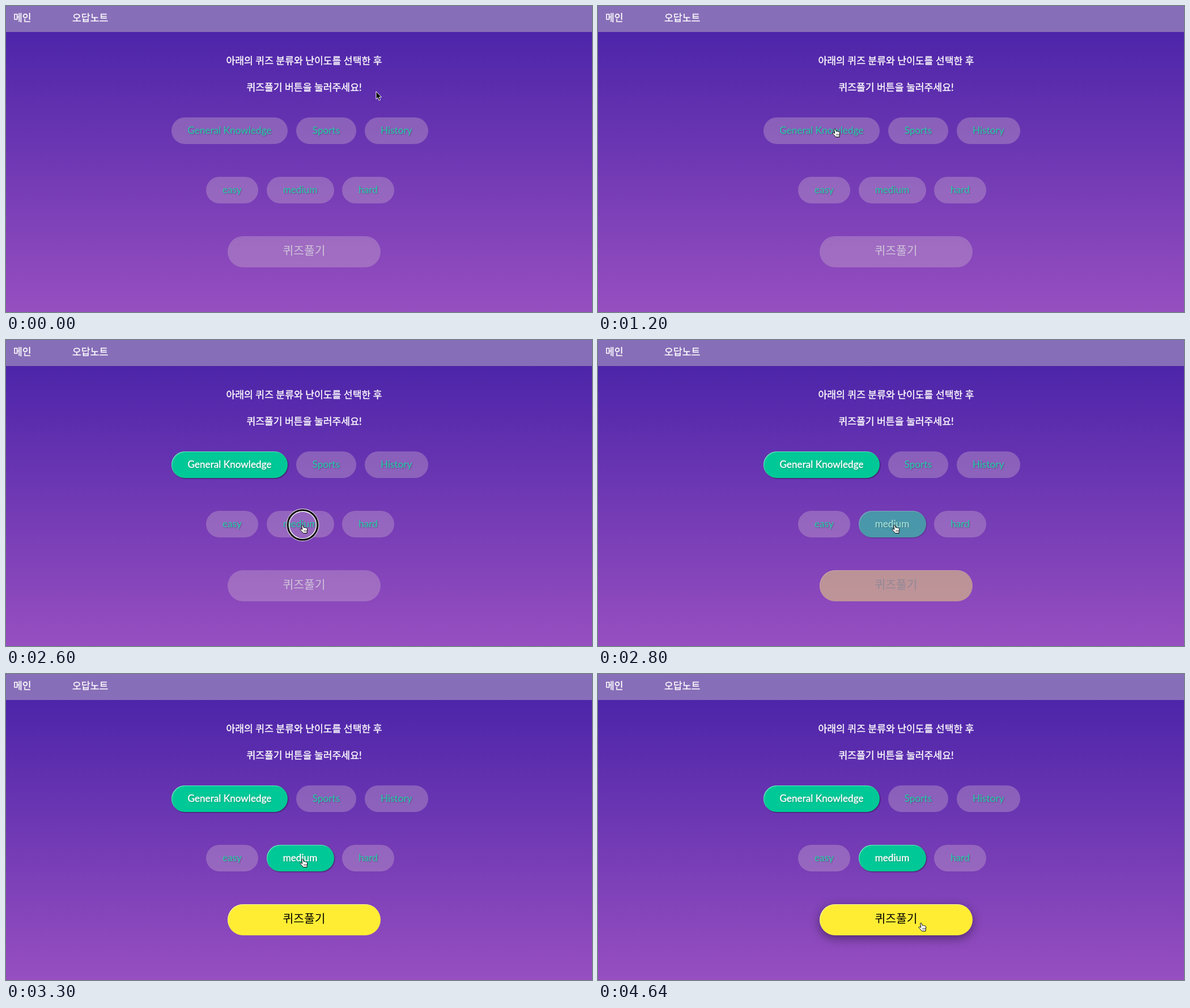
These frames come from a looping animation (1034 by 541 pixels, 4790 ms). An HTML page:

```html
<!DOCTYPE html>
<html lang="ko">
<head>
<meta charset="utf-8">
<title>퀴즈</title>
<style>
html, body { margin: 0; width: 100%; height: 100%; overflow: hidden; }
body {
  position: relative;
  background: linear-gradient(#4d25a9 46px, #974fc0 541px);
  font: 17.2px Lato, "Noto Sans CJK KR", "Noto Sans CJK", sans-serif;
  color: #fff;
}
body *, .pick::after { animation: 4790ms linear infinite; }
nav { position: absolute; inset: 0 0 auto; height: 46px; background: #876eb8; }
nav span { position: absolute; line-height: 42px; }
nav span, p { -webkit-text-stroke: .35px #fff; white-space: nowrap; }
p { position: absolute; left: 0; width: 1052px; margin: 0; line-height: 30px; text-align: center; }

.pill {
  position: absolute; height: 47px; border-radius: 24px;
  background: rgba(205, 180, 205, .35);
  color: #22cfa9; line-height: 45px; text-align: center; white-space: nowrap;
  text-shadow: 1px 1px 2px rgba(0, 0, 0, .3);
}
.pick::after {
  content: attr(data-label);
  position: absolute; inset: 0; border-radius: 24px; opacity: 0;
  background: #00c896; color: #fff;
  -webkit-text-stroke: .4px #fff;
  box-shadow: 1px 1px 2px rgba(0, 0, 0, .5), inset 1px 1px 1px rgba(255, 255, 255, .45);
}
.topic::after { animation-name: topic; }
.level::after { animation-name: level; }

.start {
  position: absolute; left: 391px; top: 407px; width: 270px; height: 54.5px;
  border-radius: 28px; font-size: 20.4px; line-height: 51px; text-align: center;
  animation-name: start;
}
svg { position: absolute; left: 0; top: 0; overflow: visible; }
.ring { opacity: 0; animation-name: ring; fill: none; }
.cursor { animation-name: move; }
.arrow { animation-name: arrow; animation-timing-function: step-end; }
.hand { animation-name: hand; animation-timing-function: step-end; }

@keyframes topic {
  0%, 31.4% { opacity: 0 }
  35.4%, 100% { opacity: 1 }
}
@keyframes level {
  0%, 56.4% { opacity: 0 }
  60.5%, 100% { opacity: 1 }
}
@keyframes start {
  0%, 56.4% {
    background: rgba(205, 180, 205, .35); color: #d0c3da;
    box-shadow: 0 4px 16px rgba(0, 0, 0, 0), inset 1px 1px 1px rgba(255, 255, 255, 0);
  }
  62.63% {
    background: #f7e245; color: #111;
    box-shadow: 0 4px 16px rgba(0, 0, 0, 0), inset 1px 1px 1px rgba(255, 255, 255, .5);
  }
  68.9%, 77.2% {
    background: #ffed34; color: #000;
    box-shadow: 0 4px 16px rgba(0, 0, 0, 0), inset 1px 1px 1px rgba(255, 255, 255, .5);
  }
  81.42% {
    background: #ffed34; color: #000;
    box-shadow: 0 3px 14px rgba(0, 0, 0, .25), inset 1px 1px 1px rgba(255, 255, 255, .5);
  }
  91.8%, 100% {
    background: #ffed34; color: #000;
    box-shadow: 0 5px 18px rgba(0, 0, 0, .42), inset 1px 1px 1px rgba(255, 255, 255, .5);
  }
}
@keyframes move {
  0%, 2% { transform: translate(653px, 151px); animation-timing-function: ease-in }
  12.526% { transform: translate(535px, 187px); animation-timing-function: ease-out }
  16.7%, 39.6% { transform: translate(418px, 217px); animation-timing-function: ease-in-out }
  52.2%, 70.9% { transform: translate(523px, 327px); animation-timing-function: ease-in-out }
  81.4%, 96.85% { transform: translate(557px, 440px) }
  96.86%, 100% { transform: translate(570px, 440px) }
}
@keyframes arrow {
  0%, 43.8%, 74% { visibility: visible }
  14.6%, 48%, 78% { visibility: hidden }
}
@keyframes hand {
  0%, 43.8%, 74% { visibility: hidden }
  14.6%, 48%, 78% { visibility: visible }
}
@keyframes ring {
  0%, 29.1% { opacity: 0; transform: translate(418px, 217px) }
  29.2%, 33.3% { opacity: 1; transform: translate(418px, 217px) }
  33.4% { opacity: 0; transform: translate(418px, 217px) }
  54.2% { opacity: 0; transform: translate(523.5px, 327px) }
  54.25%, 58.4% { opacity: 1; transform: translate(523.5px, 327px) }
  58.45%, 100% { opacity: 0; transform: translate(523.5px, 327px) }
}
</style>
</head>
<body>
<nav>
  <span style="left:13px">메인</span>
  <span style="left:117px">오답노트</span>
</nav>
<p style="top:82px">아래의 퀴즈 분류와 난이도를 선택한 후</p>
<p style="top:129px">퀴즈풀기 버튼을 눌러주세요!</p>

<div class="pill pick topic" data-label="General Knowledge" style="left:292px;top:197px;width:205px">General Knowledge</div>
<div class="pill" style="left:512px;top:197px;width:106px">Sports</div>
<div class="pill" style="left:632.5px;top:197px;width:112.5px">History</div>

<div class="pill" style="left:353px;top:302px;width:92px">easy</div>
<div class="pill pick level" data-label="medium" style="left:459.5px;top:302px;width:119px">medium</div>
<div class="pill" style="left:593px;top:302px;width:92px">hard</div>

<div class="start">퀴즈풀기</div>

<svg width="1034" height="541">
  <g class="ring">
    <circle r="26" stroke="#fff" stroke-width="5.5"/>
    <circle r="26.3" stroke="#000" stroke-width="3"/>
  </g>
  <g class="cursor" stroke-linejoin="round">
    <path class="arrow" d="M0 0V13.5L3 10.8L5.2 16L7.6 15L5.4 10H9.5Z" fill="#000" stroke="#fff"/>
    <g class="hand">
      <path d="M-1.3 1Q-.6-.8.8.6L2.6 5Q3.6 3.8 4.7 5Q5.9 4.2 6.7 5.5Q8 5 8.5 6.6Q9.2 9 8.2 11.5V14.5H1.4Q0 12-2.2 10.4Q-4.8 8-3.8 7.2Q-2.6 6.4-.2 8.2Z" fill="#fff" stroke="#000"/>
      <path d="M3 9V12M5 9V12M7 9V12" stroke="#000" stroke-width=".7"/>
    </g>
  </g>
</svg>
</body>
</html>
```
